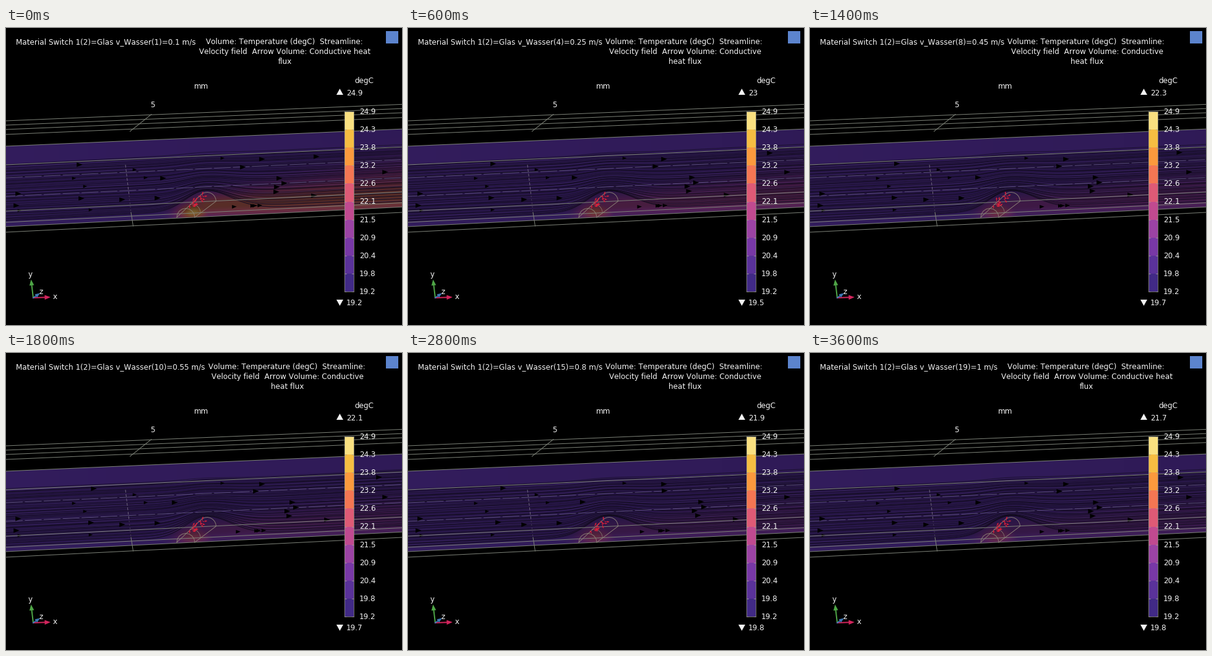
A matplotlib script for the animation above (3.8 s loop, 640x480 px).

```python
import numpy as np
import matplotlib.pyplot as plt
from matplotlib.animation import FuncAnimation
from matplotlib.collections import LineCollection, PolyCollection
from matplotlib.patches import Polygon, Rectangle

plt.rcParams["text.kerning_factor"] = 6

W, H, FRAMES, STEP_MS = 640, 480, 19, 200
PX = 0.72  # one pixel in points at 100 dpi
GRID, WHITE, RED = "#7d8278", "#f2f2f2", "#d8203a"

fig = plt.figure(figsize=(W / 100, H / 100), dpi=100, facecolor="black")
ax = fig.add_axes([0, 0, 1, 1])
ax.axis("off")
rng = np.random.default_rng(4)


def label(x, mid, s="", ha="left"):
    return ax.text(x, mid + 4.5, s, color=WHITE, fontsize=12 * PX, ha=ha,
                   va="baseline", family="DejaVu Sans", zorder=10)


def line(points, color=GRID, width=1.0, z=5, **kw):
    xs, ys = np.transpose(points)
    ax.plot(xs, ys, color=color, lw=width * PX, zorder=z, **kw)


def shape(points, color, z=9):
    ax.add_patch(Polygon(points, fc=color, lw=0, zorder=z))


def slant(x, left):
    """Height at x of the channel edge that starts at `left`."""
    return left - (26.6 + 0.03 * (left - 150)) * x / W


def smooth(v):
    v = np.clip(v, 0, 1)
    return v * v * (3 - 2 * v)


# ---- what the water speed decides ----
def hottest(v):
    return 21 + 0.745 * v ** -0.719


def coldest(v):
    return 20 - 0.2 * v ** -0.602


def arrow_shift(i):
    return 20 * (1 - np.exp(-i / 1.5)) + 14 * np.exp(-((i - 13) / 2.5) ** 2)


# ---- temperature field ----
ROOF, FLOOR, Y0, Y1 = 191, 321, 160, 324
gx, gy = np.meshgrid(np.arange(W) + 0.5, np.arange(Y0, Y1) + 0.5)
depth = slant(gx, FLOOR) - gy
inside = (depth >= 0) & (gy >= slant(gx, ROOF))
TINTS = np.array([(48, 27, 88), (82, 33, 86), (104, 44, 66),
                  (114, 64, 40), (130, 106, 48)]) / 255
band = smooth((depth - 4) / 12) * smooth((104 - depth) / 12)
shade = (1.05 - 0.22 * band) * (1 - 0.06 * gx / W)


def field(strength):
    down = np.clip((gx - 285) / 355, 0, 1)
    spread = (15 + 28 * down) * (0.7 + 0.3 * strength)
    plume = smooth((gx - 270) / 55) * np.exp(-((depth - 18) / spread) ** 2)
    plume *= 0.66 * strength ** 1.2
    bump = np.exp(-((gx - 303) / 26) ** 2 - ((depth - 9) / 15) ** 2)
    heat = np.maximum(plume, bump * (0.24 + 0.72 * strength))
    stops = np.linspace(0, 1, len(TINTS))
    rgb = [np.interp(heat, stops, tint) * shade for tint in TINTS.T]
    return np.clip(np.dstack(rgb + [inside]), 0, 1)


heat_img = ax.imshow(field(1), extent=(0, W, Y1, Y0), aspect="auto",
                     interpolation="nearest", zorder=1)
ax.set_xlim(0, W)
ax.set_ylim(H, 0)

# ---- streamlines ----
starts = np.linspace(8, 101, 44) + rng.uniform(-1.8, 1.8, 44)
sx = np.linspace(0, W, 161)
hump = np.exp(-((sx - 322) / np.where(sx < 322, 44, 58)) ** 2)


def streams(i, levels):
    out = []
    for d in levels:
        lift = 27 * np.exp(-(d - 16) / 36) * hump
        sway = 0.8 * np.sin(1.3 * d + 1.7 * i + sx / 150)
        out.append(np.column_stack([sx, slant(sx, FLOOR) - d - lift - sway]))
    return out


dark = LineCollection([], colors="#0e0918", alpha=0.55,
                      linewidths=1.1 * PX, zorder=3)
pale = LineCollection([], colors="#523a80", alpha=0.4,
                      linewidths=0.8 * PX, zorder=2)

# ---- channel edges ----
for left in (150, 157, 164, 172, ROOF, 221, 296, 314, FLOOR, 330):
    line([(0, left), (W, slant(W, left))])
for left in (242, 272):
    line([(0, left), (W, slant(W, left))], "#5f5282", 0.9, 4, dashes=(30, 4))
line([(193, 221), (199, 271)], "#766e84", 0.9, dashes=(5, 3))
line([(199, 271), (202, 298)], "#50465f", 0.8, dashes=(3, 4))
line([(202, 298), (205.5, 320)])
line([(235, 139.5), (200.5, 167)])

# ---- half cylinder: one arc, swept along its axis ----
BODY, AXIS = "#8c8276", np.array([34.5, -26])


def arc(sweep, start, end):
    a = np.radians(np.linspace(start, end, 9))
    rim = np.column_stack([290.5 + 14.5 * np.cos(a), 306 - 14.5 * np.sin(a)])
    return rim + sweep * AXIS


near, middle, far = arc(0, 180, 0), arc(0.27, 100, 0), arc(1, 140, 0)
line(near, BODY, 0.9)
line(middle, BODY, 0.7)
line(np.vstack([near[:1], far, near[-1:]]), BODY, 0.9)

# ---- arrows ----
flux = LineCollection([], colors=RED, linewidths=0.9 * PX, zorder=6)
heads = PolyCollection([], facecolors=RED, linewidths=0, zorder=6)
cones = PolyCollection([], facecolors="black", linewidths=0, zorder=4.5)
for c in (dark, pale, flux, heads, cones):
    ax.add_collection(c)

N = 16
along = rng.uniform(0, 1, N) ** 1.5
base = np.column_stack([299 + 20 * along, 288 - 17 * along])
base += rng.normal(0, 2, (N, 2))
turn = rng.uniform(-2.3, 1.2, N)
size = rng.uniform(2.5, 6.5, N)
trail = rng.uniform(360, 440, 4)

STILL = [(20, 268), (17, 287), (188, 277.5), (414, 212), (613, 233),
         (245, 275)]
SMALL = [(208, 229), (110, 243), (128, 256), (226, 242), (350, 210.5),
         (22, 295), (137, 294)]
# x, y and how far each one follows the shift
DRIFT = [(383, 225, 1), (442, 243, 1), (450, 251, 0.9), (438, 257, 0.8),
         (437, 265, 1), (119, 221, 1.1), (122, 275.5, 0.75),
         (254, 243, 0.9), (502, 208, 4.8), (498, 271, 1)]


def cone(x, y, k=0.95):
    a, b = 5 * k, 3.9 * k
    return [(x - a, y - b), (x + a, y - 0.3), (x - a, y + b)]


def cone_list(i):
    s = arrow_shift(i)
    out = [cone(*p) for p in STILL] + [cone(*p, 0.65) for p in SMALL]
    out += [cone(x + g * s, y - 0.07 * g * s) for x, y, g in DRIFT]
    out += [cone(x + 0.3 * s, slant(x, 307), 0.75) for x in trail]
    return out


def flux_parts(i):
    ang = turn + 0.3 * np.sin(2.1 * i + np.arange(N))
    unit = np.column_stack([np.cos(ang), np.sin(ang)])
    side = np.column_stack([-unit[:, 1], unit[:, 0]])
    tip = base + size[:, None] * unit
    shafts = np.stack([base, tip], axis=1)
    points = np.stack([tip + 2 * unit, tip - 1.5 * unit + 1.4 * side,
                       tip - 1.5 * unit - 1.4 * side], axis=1)
    return shafts, points


# ---- colour scale ----
BANDS = ["#412a86", "#5a329a", "#7838a6", "#9b43a4", "#c04a90", "#de5a76",
         "#f47653", "#fb993d", "#f6bd42", "#f9e080"]
TOP, LOW, X0, X1 = 135, 426, 546.5, 561.5
STEP = (LOW - TOP) / len(BANDS)
for n, c in enumerate(BANDS):
    ax.add_patch(Rectangle((X0, LOW - (n + 1) * STEP), X1 - X0, STEP,
                           fc=c, lw=0, zorder=8, antialiased=False))
for n, value in enumerate(np.linspace(19.24, 24.9, len(BANDS) + 1)):
    y = LOW - n * STEP
    label(571, y - 0.5, f"{value:.1f}")
    for x in (X0, X1 - 3):
        line([(x, y), (x + 3, y)], "#a5a096", 0.8, 9)
ax.add_patch(Rectangle((X0, TOP), X1 - X0, LOW - TOP, fill=False,
                       ec="#8c8c7d", lw=0.8 * PX, zorder=9))
shape([(534, 108), (545, 108), (539.5, 98)], WHITE)
shape([(534, 439), (545, 439), (539.5, 449)], WHITE)
label(578.5, 84, "degC", "center")
label(315.5, 94, "mm", "center")
label(237, 124, "5", "center")

# ---- axis triad ----
ORIGIN = np.array([44, 436])


def axis_arrow(name, tip, at, color, half=3.8):
    """Shaft from the origin with a pointed head, and its letter."""
    tip = np.array(tip)
    unit = (tip - ORIGIN) / np.hypot(*(tip - ORIGIN))
    side = np.array([-unit[1], unit[0]]) * half
    neck = tip - 2.5 * half * unit
    line([ORIGIN, neck], color, 2, 9)
    shape([tip, neck + side, neck - side], color)
    label(*at, name, "center")


axis_arrow("y", (40.5, 406.5), (39.5, 397.5), "#4ea546")
axis_arrow("x", (72, 435), (79.5, 433), "#d2245c")
axis_arrow("z", (55, 428.5), (57, 426), "#3e78b4", 3.2)

ax.add_patch(Rectangle((614, 5), 20, 20, fc="#5c84cd", lw=0, zorder=9))

# ---- changing text ----
study = label(16, 21.5)
title = [label(0, 21.5 + 16 * n, ha="center") for n in range(3)]
high = label(550, 104.5)
low = label(550, 444)
HEAD = "Volume: Temperature (degC)  Streamline:"
WIDE = (HEAD, "Velocity field  Arrow Volume: Conductive heat", "flux")
NARROW = (HEAD, "Velocity field  Arrow Volume: Conductive", "heat flux")


def set_text(i, v):
    speed = f"{v:.3g}"
    study.set_text(f"Material Switch 1(2)=Glas v_Wasser({i + 1})={speed} m/s")
    # a digit is 7.63 px wide, the point half of that
    digits = len(str(i + 1)) + len(speed.replace(".", ""))
    start = 287.3 + 7.63 * digits + 3.8 * ("." in speed)
    fits = start + 274 < 592
    for t, s in zip(title, WIDE if fits else NARROW):
        t.set_text(s)
        t.set_x(start + (137 if fits else 126) - 1.5 * (s == HEAD))
    high.set_text(f"{hottest(v):.3g}")
    low.set_text(f"{coldest(v):.3g}")


def update(i):
    v = 0.1 + 0.05 * i
    heat_img.set_data(field((hottest(v) - 20.6) / 4.3))
    dark.set_segments(streams(i, starts))
    pale.set_segments(streams(i, starts[::2] + 1.1))
    shafts, points = flux_parts(i)
    flux.set_segments(shafts)
    heads.set_verts(points)
    cones.set_verts(cone_list(i))
    set_text(i, v)
    return []


anim = FuncAnimation(fig, update, frames=FRAMES, interval=STEP_MS,
                     init_func=lambda: update(0), repeat=True, blit=False)
plt.show()
```
